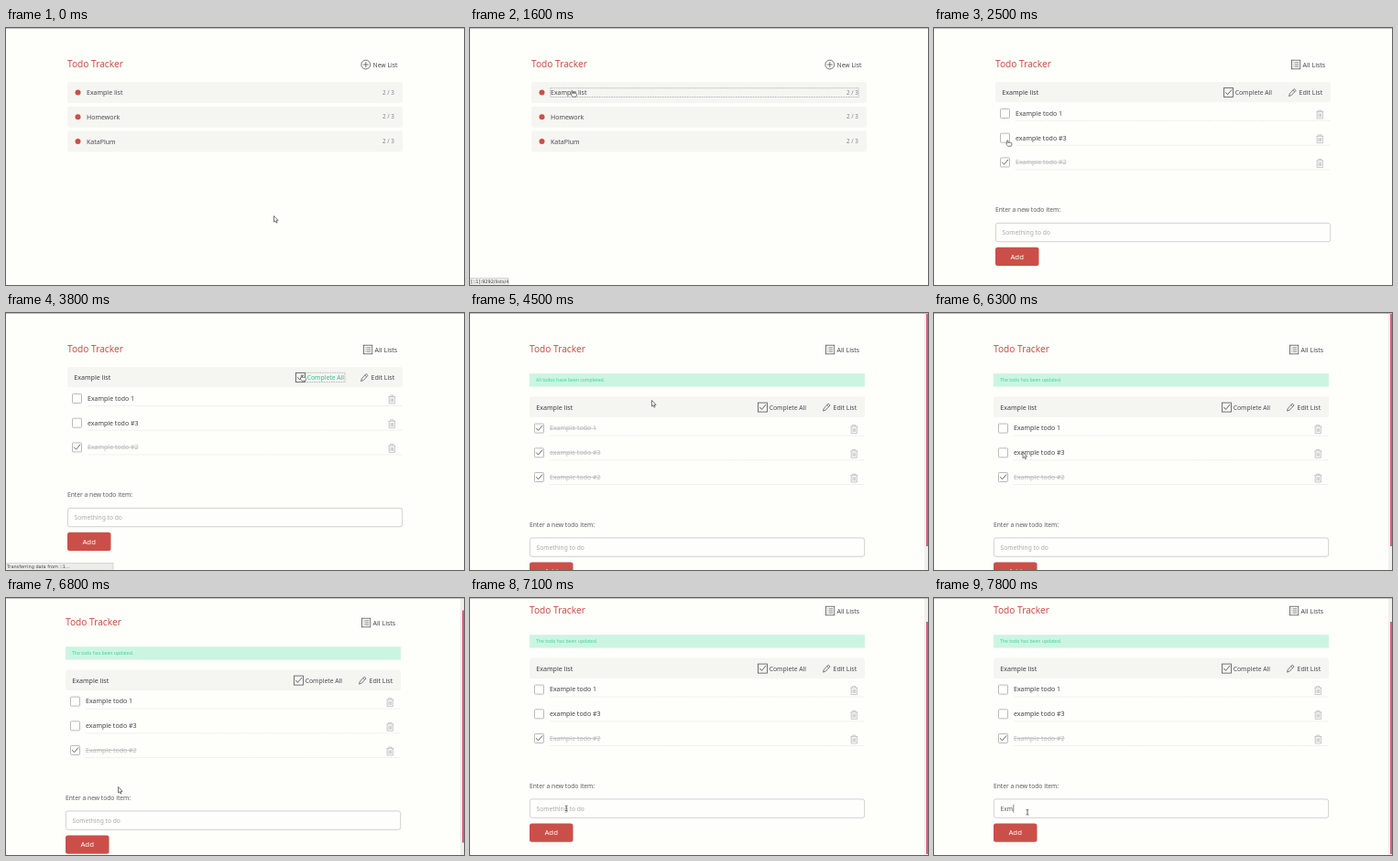
These frames come from a looping animation (500 by 281 pixels, 8000 ms). An HTML page:

```html
<!DOCTYPE html>
<html lang="en">
<head>
<meta charset="utf-8">
<title>Todo Tracker</title>
<style>
  html, body { margin: 0; width: 100%; height: 100%; overflow: hidden; background: #fefefb; }
  svg { display: block; width: 100vw; height: 100vh; }
  text { font-family: "Noto Sans", "Open Sans", sans-serif; white-space: pre; }
  .status { font-family: "DejaVu Sans", sans-serif; }
  .done { text-decoration: line-through; }
</style>
</head>
<body>
<svg id="stage" viewBox="0 0 500 281"></svg>
<script>
const DURATION = 8000, STEP = 100;
const INK = '#4b4b4b', MUTED = '#a9a9a6', RED = '#cb4f49', GREEN = '#2cc38d', PANEL = '#f5f5f2';

// [start, end, x, y, easing]
const smooth = p => p * p * (3 - 2 * p);
const easeOut = p => 1 - (1 - p) ** 3;
const MOVES = [
  [500, 1400, 111, 68, smooth],
  [1800, 2500, 79.5, 122, smooth],
  [2600, 3400, 322, 67, smooth],
  [4100, 4900, 75, 124, smooth],
  [5200, 5800, 76, 150, easeOut],
  [6200, 6300, 97, 152, smooth],
  [6400, 6500, 122.5, 206.5, smooth],
  [6800, 7200, 102, 234, smooth],
];

// [time, value] tables; the latest entry applies
const POINTER = [[0, 'arrow'], [1500, 'hand'], [1800, 'arrow'], [2400, 'hand'], [2700, 'arrow'],
  [3300, 'hand'], [3900, 'arrow'], [4900, 'hand'], [5300, 'arrow'], [5700, 'hand'],
  [6300, 'arrow'], [7100, 'beam']];
const CHECKED = [[0, [0, 0, 1]], [3900, [1, 1, 1]], [5300, [0, 1, 1]], [6300, [0, 0, 1]]];
const LOADING = 'Transferring data from ::1…';
const STATUS = [[0, ''], [1500, '[::1]:9292/lists/4'], [1800, ''], [3700, LOADING], [3900, ''],
  [5200, LOADING], [5300, ''], [6100, LOADING], [6300, '']];
const FLASH = [[0, ''], [3900, 'All todos have been completed.'], [5300, 'The todo has been updated.']];
const SCROLL = [[0, 0], [6800, 13], [6900, 19], [7000, 24], [7100, 26]];
const TYPED = [[0, ''], [7500, 'E'], [7600, 'Ex'], [7800, 'Exm']];
const at = (table, t) => table.filter(([from]) => from <= t).pop()[1];

const text = (x, y, str, size = 6.8, fill = INK, extra = '') =>
  `<text x="${x}" y="${y}" font-size="${size}" fill="${fill}" ${extra}>${str}</text>`;
const rect = (x, y, w, h, fill, extra = '') =>
  `<rect x="${x}" y="${y}" width="${w}" height="${h}" fill="${fill}" ${extra}/>`;
const path = (d, stroke = INK, width = .8, extra = '') =>
  `<path d="${d}" fill="none" stroke="${stroke}" stroke-width="${width}" ${extra}/>`;
const group = (x, y, body) => `<g transform="translate(${x} ${y})">${body}</g>`;
const dotted = (x, y, w, h) =>
  rect(x, y, w, h, 'none', 'stroke="#777" stroke-width=".6" stroke-dasharray=".8 .8"');

const title = text(67, 42.8, 'Todo Tracker', 10.15, RED);
const tick = (x, y) => path(`M${x} ${y}l2.3 2.6 4.6-5.4`, '#555', .9);

function listsPage(t) {
  const rows = ['Example list', 'Homework', 'KataPlum'].map((name, i) => group(0, i * 26.7,
    rect(67, 59, 366, 23, PANEL, 'rx="2.5"') +
    `<circle cx="78.5" cy="70.5" r="3" fill="${RED}"/>` +
    text(88, 73.2, name, 7) + text(411, 72.8, '2 / 3', 6.3, '#858583')));
  return title +
    '<circle cx="392.8" cy="40" r="4.9" fill="none" stroke="#555" stroke-width=".8"/>' +
    path('M392.8 37v6M389.8 40h6', '#555') + text(400.5, 42.8, 'New List') +
    rows.join('') + (t >= 1600 ? dotted(87.7, 65.7, 336.6, 9.8) : '');
}

const trash = path('M417.3 91.6h8M419.6 91.4v-1.3h3.4v1.3M418.2 91.8v7.2h6.2v-7.2M420 93.3v4.2M421.3 93.3v4.2M422.6 93.3v4.2', '#aaa', .65);

function todoRow(name, i, done) {
  return group(0, i * 26.7,
    rect(72.5, 88.5, 10, 10, '#fff', 'stroke="#aaa" stroke-width=".8" rx=".8"') +
    (done ? tick(74.2, 93.2) : '') +
    text(89, 95.9, name, 7, done ? '#b6b6b3' : '#404040', done ? 'class="done"' : 'font-weight="500"') +
    trash + path('M89 101.5H433', '#deded9', .6, 'stroke-dasharray="1 .5"'));
}

function header(t) {
  const hover = t >= 3300 && t < 3900;
  return rect(67, 59, 366, 22.3, PANEL, 'rx="2.5"') + text(74.3, 73.4, 'Example list', 7.1, '#404040') +
    rect(316.5, 65.5, 10, 10, 'none', 'stroke="#555" stroke-width=".8"') + tick(318.2, 70.2) +
    text(328.7, 73.2, 'Complete All', 6.8, hover ? GREEN : INK) +
    path('M387.5 74.5l.9-2.9 4.8-5.1 1.9 1.8-4.8 5.2zM391.8 68l1.9 1.8', '#555', .75) +
    text(398.5, 73.2, 'Edit List', 7) +
    (hover && t >= 3600 ? dotted(316, 65.3, 54, 10.2) : '');
}

function newTodo(t) {
  const typed = at(TYPED, t);
  const caret = t >= 7400 ? [74.5, 78.6, 82.1, 88.8][typed.length] : 0;
  return text(67, 201.4, 'Enter a new todo item:', 6.7, '#5c5c5a') +
    rect(67.4, 213.3, 365.3, 20.4, '#fff', 'fill-opacity=".5" stroke="#c6c6c2" stroke-width=".8" rx="2.5"') +
    text(74.5, 226.3, typed || 'Something to do', 6.7, typed ? '#5c5c5a' : MUTED) +
    (caret ? path(`M${caret} 219.3v8.6`, '#333', .6) : '') +
    rect(67, 239.8, 47.5, 20.3, RED, 'rx="2.5"') + text(83.4, 252.8, 'Add', 7.8, '#fff');
}

function todosPage(t) {
  const flash = at(FLASH, t), scroll = at(SCROLL, t), done = at(CHECKED, t);
  const names = ['Example todo 1', 'example todo #3', 'Example todo #2'];
  const top = title +
    rect(390.4, 35.2, 9.4, 9.6, 'none', 'stroke="#555" stroke-width=".8"') +
    path('M393.5 37.8h4.8M393.5 40h4.8M393.5 42.2h4.8M391.8 37.8h.8M391.8 40h.8M391.8 42.2h.8', '#555', .7) +
    text(402.6, 42.8, 'All Lists', 7) +
    (flash ? rect(67, 66.2, 366, 14.3, '#cbf5e1') + text(74, 75.2, flash, 5.1, '#3fd49a') : '');
  const main = header(t) + names.map((name, i) => todoRow(name, i, done[i])).join('') + newTodo(t);
  return group(flash ? -2 : 0, -scroll, top + group(0, flash ? 32.6 : 0, main)) +
    (flash ? rect(496, 0, 4, 281, '#f0f0ee') + rect(498, 1 + scroll * .96, 2, 254, '#d6617b') : '');
}

function statusBar(label) {
  if (!label) return '';
  const width = label === LOADING ? 118 : 43;
  return rect(-1, 273.4, width, 9, '#ecece9', 'stroke="#c4c4c0" stroke-width=".6"') +
    text(1, 279.2, label, 5, '#444', 'class="status"');
}

const pointers = {
  arrow: '<path d="M0 0V6.6L1.5 5.3 2.5 7.6 3.6 7.1 2.6 4.9H4.6Z" fill="#fff" stroke="#444" stroke-width=".7"/>',
  hand: '<path d="M.2 4.2V1.2q.6-.9 1.2 0v2.1h3q1 .1 1 1.2v1.3l-.6 1.4H1.3L-.8 5.1q.2-1 1-.9Z" fill="#fff" stroke="#444" stroke-width=".7"/>',
  beam: path('M-1.4-2.6Q0-2.6 0-1.8Q0-2.6 1.4-2.6M0-2V2.6M-1.4 3.2Q0 3.2 0 2.4Q0 3.2 1.4 3.2', '#444', .8),
};

function pointerPosition(t) {
  let x = 292.5, y = 205.5;
  for (const [start, end, toX, toY, ease] of MOVES) {
    if (t <= start) break;
    const p = ease(Math.min(1, (t - start) / (end - start)));
    x += (toX - x) * p;
    y += (toY - y) * p;
  }
  return [x, y];
}

const stage = document.getElementById('stage');
function draw(t) {
  stage.innerHTML = rect(0, 0, 500, 281, '#fefefb') +
    (t < 1800 ? listsPage(t) : todosPage(t)) +
    rect(0, 0, 500, .9, '#b9b9b4') + statusBar(at(STATUS, t)) +
    group(...pointerPosition(t), pointers[at(POINTER, t)]);
}

const began = performance.now();
let shown = -1;
function frame() {
  const t = Math.floor((performance.now() - began) % DURATION / STEP) * STEP;
  if (t !== shown) draw(shown = t);
  requestAnimationFrame(frame);
}
frame();
</script>
</body>
</html>
```
